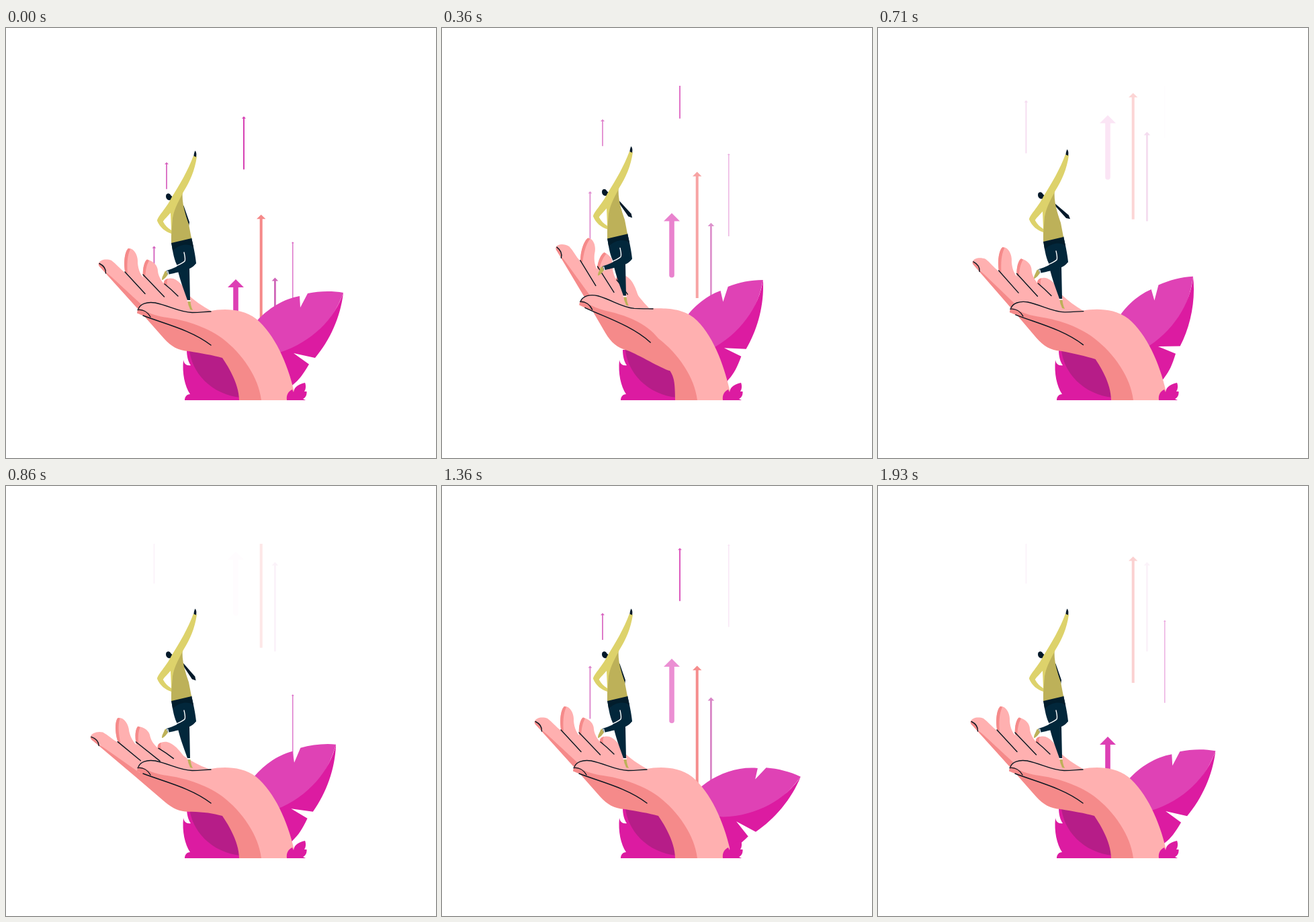
An HTML page with a canvas that plays this animation: 640x640 px, repeating every 2000 ms.

```html
<!DOCTYPE html>
<html lang="en">
<head>
<meta charset="utf-8">
<title>Growth in hand</title>
<style>
  html, body { margin: 0; width: 100%; height: 100%; overflow: hidden; background: #fff; }
  canvas { display: block; width: 640px; height: 640px; }
</style>
</head>
<body>
<canvas id="stage" width="640" height="640"></canvas>
<script>
const ctx = document.getElementById('stage').getContext('2d');
const LOOP = 2000, FPS = 14, RISE = 282, LEAD = 0.35;
const LIGHT = '#ffb0b0', SHADE = '#f58a8a', INK = '#081620';
const PINK = '#df42b5', MAGENTA = '#dc1ba1', PLUM = '#b61d88';
const YELLOW = '#ddd26b', OLIVE = '#bdb159', NAVY = '#02273b', NIGHT = '#03192a';

// x, first tip y, length, shaft width, head width, head height, period in steps, colour
const arrows = [
  [342, 374.5, 96, 7.6, 24, 12, 13.4, '#dd40b4'],
  [379.7, 278, 188, 4, 13.4, 6.6, 17.35, '#f58989'],
  [400.4, 372, 133, 2.8, 9.6, 5, 15, '#cf66b8'],
  [426.8, 319, 123, 1.3, 4, 2, 11.17, '#d860c2'],
  [354, 132, 79, 2, 6, 3.2, 15.65, '#d63fb3'],
  [239, 200, 40, 1.7, 6, 3.2, 17.3, '#d65fbd'],
  [220.4, 325, 79, 1.8, 5.6, 3.2, 15, '#d25fbc']
];

const ease = u => u * u * (3 - 2 * u);

// Eased value through [step, value] keys
function track(n, ...keys) {
  for (let i = 1; i < keys.length; i++) {
    const [a, v] = keys[i - 1], [b, w] = keys[i];
    if (n <= b) return v + (w - v) * ease((n - a) / (b - a));
  }
  return keys[keys.length - 1][1];
}

function turn(cx, cy, deg) {
  const a = deg * Math.PI / 180, c = Math.cos(a), s = Math.sin(a);
  return (x, y) => [cx + (x - cx) * c - (y - cy) * s, cy + (x - cx) * s + (y - cy) * c];
}

// A letter before a point picks the joint that carries it:
// f fingers, t thumb, k inner wrist, w outer wrist
let joints = {};
function path(d) {
  return new Path2D(d.replace(/([ftkw]?)(-?[\d.]+),(-?[\d.]+)/g, (all, j, x, y) =>
    j ? joints[j](+x, +y).map(v => v.toFixed(2)).join(',') : x + ',' + y));
}

function fill(color, d) {
  ctx.fillStyle = color;
  ctx.fill(path(d));
}

function line(color, width, d) {
  ctx.strokeStyle = color;
  ctx.lineWidth = width;
  ctx.stroke(path(d));
}

function spun(x, y, deg, draw) {
  ctx.save();
  ctx.translate(x, y);
  ctx.rotate(deg * Math.PI / 180);
  ctx.translate(-x, -y);
  draw();
  ctx.restore();
}

function drawArrow(n, [x, start, len, w, hw, hh, period, color]) {
  const p = ease(((n + LEAD) % period) / period);
  const y = start - RISE * p;
  ctx.globalAlpha = 1 - p;
  ctx.fillStyle = color;
  ctx.beginPath();
  ctx.moveTo(x, y);
  ctx.lineTo(x + hw / 2, y + hh);
  ctx.lineTo(x + w / 2, y + hh);
  const r = w > 6 ? w / 2 : 0;
  ctx.lineTo(x + w / 2, y + len - r);
  if (r) ctx.arc(x, y + len - r, r, 0, Math.PI);
  ctx.lineTo(x - w / 2, y + len - r);
  ctx.lineTo(x - w / 2, y + hh);
  ctx.lineTo(x - hw / 2, y + hh);
  ctx.fill();
  ctx.globalAlpha = 1;
}

function drawLeaves(n) {
  const sway = track(n, [0, 0], [8.5, -15.3], [17.5, 16.8], [27.5, 0]);
  spun(378, 528, sway, () => {
    fill(PINK, 'M345,500 C347,455 388,408 437,399 L438,416 L449,395 C466,391.5 485,391 502,394 C485,440 455,470 407,484 L350,540 Z');
    fill(MAGENTA, 'M502,394 C498,430 482,465 460,491 L428,484 L451,500.5 C442,516 436,524 427,531 C412,545 390,556 350,554 L365,490 L407,483 C455,468 490,432 502,394 Z');
  });
  fill(MAGENTA, 'M269,479 C269,488 271,497 275,502 C269,503 265,500 264,494 C262,514 266,533 274,545 C269,545 266,549 266,554 L350,554 L345,479 Z');
  fill(PLUM, 'M273,479 C276,512 305,546 350,550 L350,479 Z');
}

function setJoints(h) {
  const up = Math.max(h, 0);
  joints = {
    f: h > 0 ? turn(279, 501, 11 * h) : turn(301, 451, 17 * h),
    t: turn(361, 538, 4.3 * up),
    k: (x, y) => [x + 17 * up, y + 19 * up],
    w: (x, y) => [x + 2 * up, y - 2 * up]
  };
}

function drawHand() {
  // Fingers
  fill(LIGHT, 'M f178,366 C f174,350 f177,332 f182,328 C f190,327 f197,338 f196,350 C f197,360 f200,367 f206,374 L f207,396 Z');
  fill(SHADE, 'M f178,366 C f174,350 f177,332 f182,328 L f185,329 C f180,340 f180,352 f181,368 Z');
  fill(LIGHT, 'M f204,370 C f203,358 f206,347 f210,344.5 C f220,347 f226,354 f226,362 C f227,370 f231,376 f237,383 L f230,398 Z');
  fill(SHADE, 'M f204,370 C f203,358 f206,347 f210,344.5 L f213,346 C f209,353 f208,360 f207,371 Z');
  fill(LIGHT, 'M f235,383 C f233,375 f241,371 f249,373 C f260,377 f266,388 f273,400 L f250,402 Z');
  fill(SHADE, 'M f235,383 C f234,377 f236,374 f241,373 C f239,377 f239,380 f241,386 Z');
  // Palm and forefinger
  fill(LIGHT, 'M f138,350 C f140,345 f149,343 f157,346 C f164,351 f170,359 f177,364 L f205,371 L f236,382 L f270,396 C f281,406 f292,414 f305,421 L f300,440 L f235,450 L f195,414 Z');
  fill(SHADE, 'M f138,350 C f137,353 f139,355 f141,357 L f197,419 L f235,462 C f246,474 f256,480 f272,481 C f290,484 k308,487 k322,491 C k328,500 347,528 347,554 L400,554 L400,500 L350,440 L t240,420 L t210,418 L f203,413 L f149,363 C f148,357 f144,353 f138,350 Z');
  // Thumb and arm
  fill(SHADE, 'M t197,417 C t196,420 t195,422 t195,424.5 C t202,427 t210,431 t228,436 L t230,422 Z');
  fill(LIGHT, 'M t197,417 C t200,411 t209,407 t222,409 C t245,414 t258,423 t277,423.5 C t290,423.5 t297,421 t305,421 C320,418 w351,416 w372.5,433 C w400,456 419,499 428.5,540 L428.5,554 L380,554 C376,520 352,485 322,462 C t296,443 t262,434 t240,431 C t225,429 t214,425 t207,421 Z');
  // Creases
  const ink = d => line(INK, 1.4, d);
  ink('M f139,350.5 C f144,353 f149,357 f148.5,365');
  ink('M f177,363 L f207,395.5');
  ink('M f204,367 L f235.5,400');
  ink('M f236,381 Q f246,389 f256,399');
  ink('M t197,418 C t200,411 t209,407 t222,409 C t245,414 t258,423 t277,423.5 C t290,423.5 t297,422 t305,422');
  ink('M t196,419.5 C t204,418.5 t211,423 t215,430');
  ink('M t204,428 C t235,440 t275,449 t305,472');
}

function drawMan(n) {
  const lift = track(n, [0, 0], [3, 0], [7, 13], [11, 0]);
  const swing = track(n, [0, 0], [8, -34], [18, 0]);
  ctx.save();
  ctx.translate(0, -lift);
  fill(NIGHT, 'M238.2,249 C239,245.3 244,245.4 245.2,249 L248,251.5 C246.7,253 248,255.5 245,256.2 C240,257 237.3,253 238.2,249 Z');
  spun(263, 265, swing, () => {
    fill(NIGHT, 'M262,264 L264.5,264.5 L273,289 L272,295 L267.5,291 Z');
  });
  // Feet and trousers
  fill(OLIVE, 'M238,361 L241,367 L237,372 C235,373 234,375 232,375 C232,370 235,367 236,363 Z');
  fill(OLIVE, 'M270.5,407 L274.5,407 C275,412 276,416 278,420 L274,419 C273,415 271,413 270.5,407 Z');
  fill(NAVY, 'M246,319 L276,312 C279,325 282,339 283,350 C279,355 276,357 273,358 L274,405 L270,405 C264,388 257,370 254,352 C249,341 248,330 246,319 Z');
  fill(NAVY, 'M278,348 L283,350 C276,359 264,362 241,367 L239,361 C250,358 257,354 267,347 Z');
  fill('#021d2c', 'M246,319 L276,312 L279,326 C271,320 259,322 251,329 L248,331 Z');
  line('#fff', 1.4, 'M265,334 C266,339 267.5,344 266,347 C263,350 258,352 253.5,354');
  line('#fff', 1.3, 'M240.7,362 L242,367 M270,406 L274.5,406');
  // Shirt
  fill(OLIVE, 'M263,242 C261,260 267,277 272,292 L276,313 L246,320 L246,278 Z');
  fill(YELLOW, 'M279,190 L284,191.5 C281,212 274,228 264,244 C258,256 251,267 248,283 C247,296 246,306 246,314 L246,306 C237,303 229,297 225,287 C225,281 239,268 246,253 C258,234 271,212 279,190 Z');
  fill('#fff', 'M245,275 C241,280 236,284 233.7,288 C237,294 241,298 246,301 Z');
  fill(NIGHT, 'M279.5,190.5 C279.5,187 280.5,185 281.5,182.5 C283.5,185 283.8,188 283,192 Z');
  ctx.restore();
}

function draw(n) {
  ctx.clearRect(0, 0, 640, 640);
  ctx.save();
  ctx.beginPath();
  ctx.rect(0, 86, 640, 468);
  ctx.clip();
  ctx.lineCap = 'round';
  arrows.forEach(a => drawArrow(n, a));
  drawLeaves(n);
  setJoints(track(n, [0, 0], [6, 1.1], [13, -0.55], [17.7, 0]));
  drawHand();
  drawMan(n);
  fill(MAGENTA, 'M418,554 C417,546 420,541 426,538 L428,542 C429,533 437,530 445,528 C447,533 446,538 444,541 L447.5,541 C448,546 446,550 442,552 L446,554 Z');
  ctx.restore();
}

const begin = performance.now();
function tick() {
  const t = (performance.now() - begin) % LOOP;
  draw(Math.min(27, Math.floor((t + 5) * FPS / 1000)));
  requestAnimationFrame(tick);
}
tick();
</script>
</body>
</html>
```
